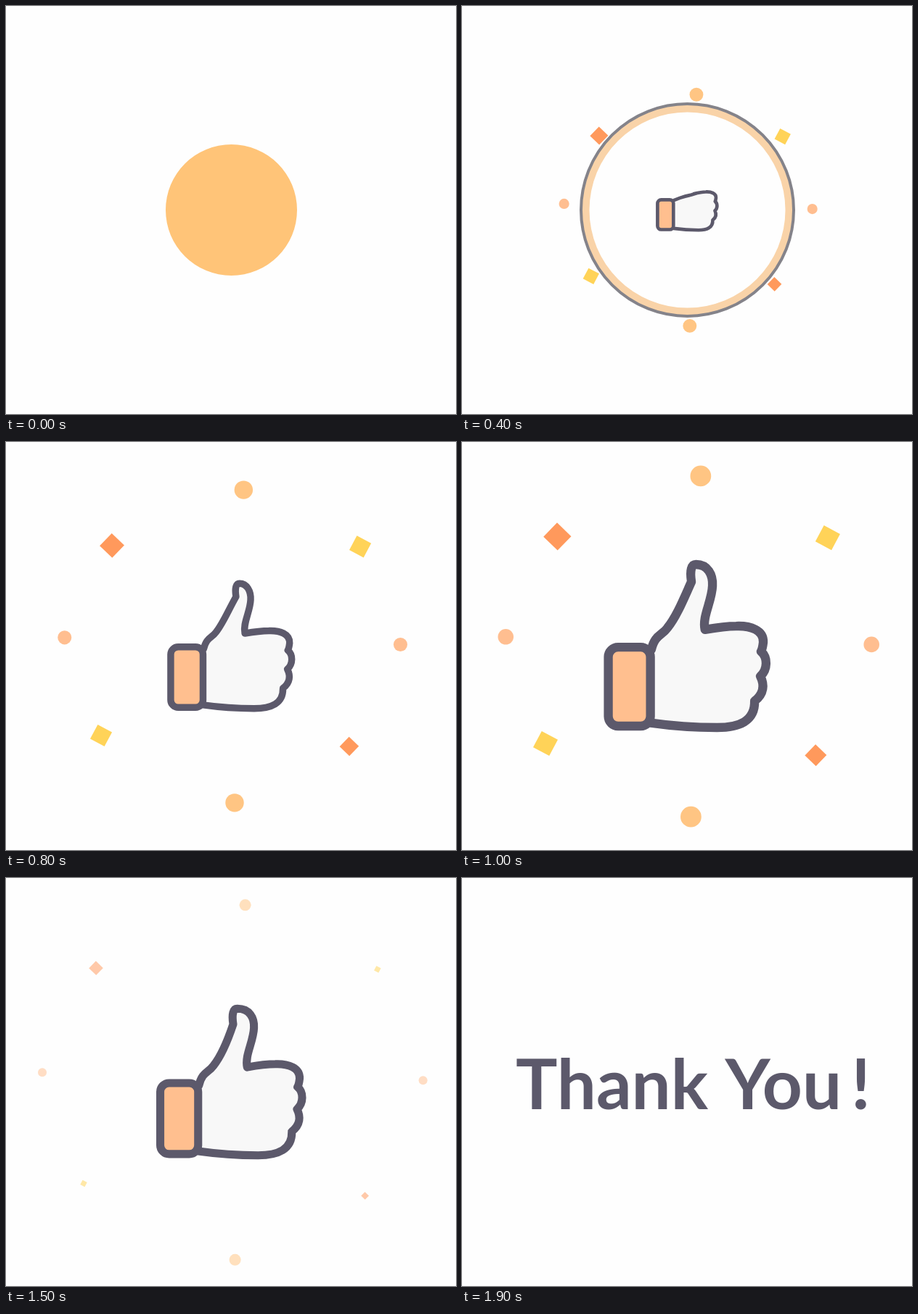
Recreate the animation shown at these times as an HTML page with a canvas. Size 620 by 563 pixels, loop 3.9 s.

```html
<!DOCTYPE html>
<html>
<head>
<meta charset="utf-8">
<style>
html, body { margin: 0; height: 100%; overflow: hidden; background: #fefefe; }
canvas { display: block; }
</style>
</head>
<body>
<canvas id="stage" width="620" height="563"></canvas>
<script>
const ctx = document.getElementById('stage').getContext('2d');
const LOOP = 3900, STEP = 100, CX = 310.5, CY = 281.5;
const INK = '#5c596b';

const lerp = (a, b, k) => a + (b - a) * k;
// 0 before from, 1 after to, linear between
const ramp = (t, from, to) => Math.min(1, Math.max(0, (t - from) / (to - from)));
// Parabola through a, b, c at v = 0, 1, 2
const curve = (v, a, b, c) => a + (b - a) * v + (c - 2 * b + a) * v * (v - 1) / 2;

function scaled(s, paint) {
  ctx.save();
  ctx.translate(CX, CY);
  ctx.scale(s, s);
  ctx.translate(-CX, -CY);
  paint();
  ctx.restore();
}

function ring(t) {
  if (t > 500) return;
  const v = t / 200;
  const r = curve(v, 90.5, 125, 146.5);
  const hole = Math.min(r, curve(v, 0, 75, 135));
  ctx.globalAlpha = t < 500 ? 1 : 0.5;
  ctx.fillStyle = `rgb(${curve(v, 255, 243, 249)},${curve(v, 196, 192, 211)},${curve(v, 120, 143, 168)})`;
  ctx.beginPath();
  ctx.arc(CX, CY, r, 0, 7);
  ctx.arc(CX, CY, hole, 0, 7);
  ctx.fill('evenodd');
  if (t > 0) {
    ctx.strokeStyle = '#84838a';
    ctx.lineWidth = t / 100;
    ctx.beginPath();
    ctx.arc(CX, CY, r, 0, 7);
    ctx.stroke();
  }
  ctx.globalAlpha = 1;
}

// Clockwise from the top: final x, y and full radius or side
const bits = [
  [329.6, 37.3, 15.2], [511.8, 126, 26.6], [574.6, 279.3, 11.4], [494.6, 438.5, 22.4],
  [315.6, 526.8, 15.2], [107, 421.5, 26.6], [50, 268.3, 11.4], [124, 124.3, 28.6]
];
// Colour, final loss of size and angle of squares, repeating around the ring
const kinds = [['#ffc583', 7.2], ['#ffd358', 19.6, 28], ['#ffbe90', 5.4], ['#ff995c', 14.8, 44]];

function burst(t) {
  if (t < 400 || t > 1600) return;
  const spread = 0.652 + 0.16 * ramp(t, 400, 600) + 0.07 * ramp(t, 600, 800) + 0.118 * ramp(t, 800, 1100);
  const growth = lerp(0.62, 1, ramp(t, 400, 1100));
  ctx.globalAlpha = lerp(1, 0.06, ramp(t, 1400, 1600));
  bits.forEach(([x, y, full], i) => {
    const [color, loss, angle] = kinds[i % 4];
    const size = full * growth - loss * ramp(t, 1100, 1200);
    ctx.save();
    ctx.translate(lerp(CX, x, spread), lerp(CY, y, spread));
    ctx.fillStyle = color;
    ctx.beginPath();
    if (angle) {
      ctx.rotate(angle * Math.PI / 180);
      ctx.rect(-size / 2, -size / 2, size, size);
    } else ctx.arc(0, 0, size, 0, 7);
    ctx.fill();
    ctx.restore();
  });
  ctx.globalAlpha = 1;
}

const THUMB = [
  [248, 288], [254, 262], [266, 264], [276, 250], [292, 230], [304, 200], [314, 170],
  [311, 150], [314, 140], [322, 140], [346, 140], [355, 158], [354, 177],
  [353, 204], [336, 230], [341, 253]
];
const FINGERS = 'C375 247 386 247 395 247C420 246 443 254 442 275C441 284 440 288 438 291' +
  'C450 301 450 322 437 334C444 348 444 364 427 377C428 412 400 423 362 423C320 423 275 419 247 415';

// The thumb rises out of the fist by grow, then its tip bends outwards by bend
function handPath(grow, bend) {
  const points = THUMB.map(([x, y]) => {
    const d = 393 - x, fist = 247 + 0.11 * d + 0.0011 * d * d;
    const tip = x < 330 && y < 175 ? 7 * (1 - bend) : 0;
    return [x + tip, lerp(fist, y, grow)];
  });
  return new Path2D(`M${points[0]}C${points.slice(1).join(' ')}${FINGERS}`);
}

function hand(t) {
  if (t < 300 || t > 1700) return;
  const s = t < 1200 ? curve((t - 400) / 400, 0.3, 0.61, 1) : lerp(1, 0.145, ramp(t, 1400, 1700));
  const grow = ramp(t, 400, 800);
  scaled(s, () => {
    ctx.translate(0, -49 * (1 - grow));
    ctx.strokeStyle = INK;
    ctx.lineWidth = 15.5;
    ctx.lineJoin = ctx.lineCap = 'round';
    const palm = handPath(grow, ramp(t, 800, 1200));
    ctx.fillStyle = '#f8f8f8';
    ctx.fill(palm);
    ctx.stroke(palm);
    ctx.fillStyle = '#ffbf8f';
    ctx.beginPath();
    ctx.roundRect(173.5, 283.5, 73, 137, 17);
    ctx.fill();
    ctx.stroke();
  });
}

function thanks(t) {
  if (t < 1800) return;
  scaled(ramp(t, 1700, 1900), () => {
    ctx.fillStyle = INK;
    ctx.font = '700 96px Lato, sans-serif';
    ctx.fillText('Thank', 74, 319);
    ctx.fillText('You', 362.5, 319);
    ctx.textAlign = 'center';
    ctx.fillText('!', 549.5, 319);
  });
}

const start = performance.now();
function draw() {
  const t = Math.floor((performance.now() - start) % LOOP / STEP) * STEP;
  ctx.fillStyle = '#fefefe';
  ctx.fillRect(0, 0, 620, 563);
  ring(t);
  burst(t);
  hand(t);
  thanks(t);
  requestAnimationFrame(draw);
}
draw();
</script>
</body>
</html>
```
